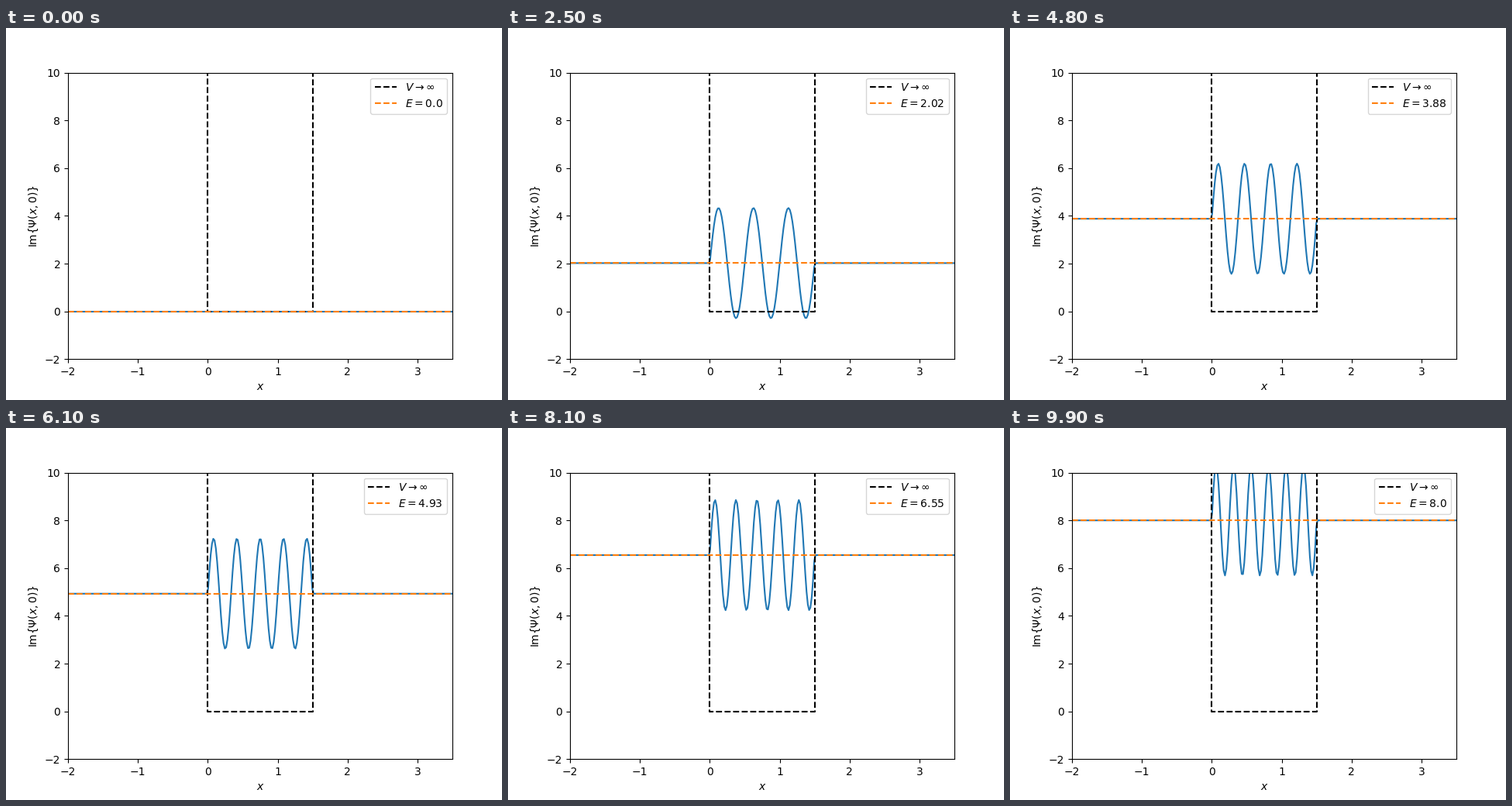
A matplotlib script for the animation above (10 s loop, 640 px wide and 480 px high).

```python
import numpy as np
import matplotlib.pyplot as plt
from matplotlib.animation import FuncAnimation

L = 1.5                      # well width
FRAMES, INTERVAL = 100, 100
E_MAX = 8
AMPLITUDE = 2 * np.sqrt(2 / L)

energies = np.linspace(0, E_MAX, FRAMES)
x = np.linspace(-2, 3.5, 300)
inside = (x >= 0) & (x <= L)


def psi(energy):
    """Highest bound state that fits below the given energy (h = m = 1)."""
    n = np.floor(L * np.sqrt(8 * energy) + 1e-9)
    return np.where(inside, AMPLITUDE * np.sin(n * np.pi * x / L), 0)


fig, ax = plt.subplots(figsize=(6.4, 4.8), dpi=100)
wave, = ax.plot(x, np.zeros_like(x))
ax.plot([0, 0, L, L], [100, 0, 0, 100], "k--", label=r"$V \to \infty$")
level, = ax.plot(x, np.zeros_like(x), "--", label="$E=0.0$")
ax.set_xlim(-2, 3.5)
ax.set_ylim(-2, 10)
ax.set_xlabel("$x$")
ax.set_ylabel(r"Im$\{\Psi(x,0)\}$")
legend = ax.legend(loc="upper right")
energy_text = legend.get_texts()[1]


def update(i):
    energy = energies[i]
    wave.set_ydata(psi(energy) + energy)
    level.set_ydata(np.full_like(x, energy))
    energy_text.set_text(f"$E={round(float(energy), 2)}$")
    return wave, level, energy_text


anim = FuncAnimation(fig, update, frames=FRAMES, interval=INTERVAL,
                     repeat=True, repeat_delay=0, blit=False)
plt.show()
```
